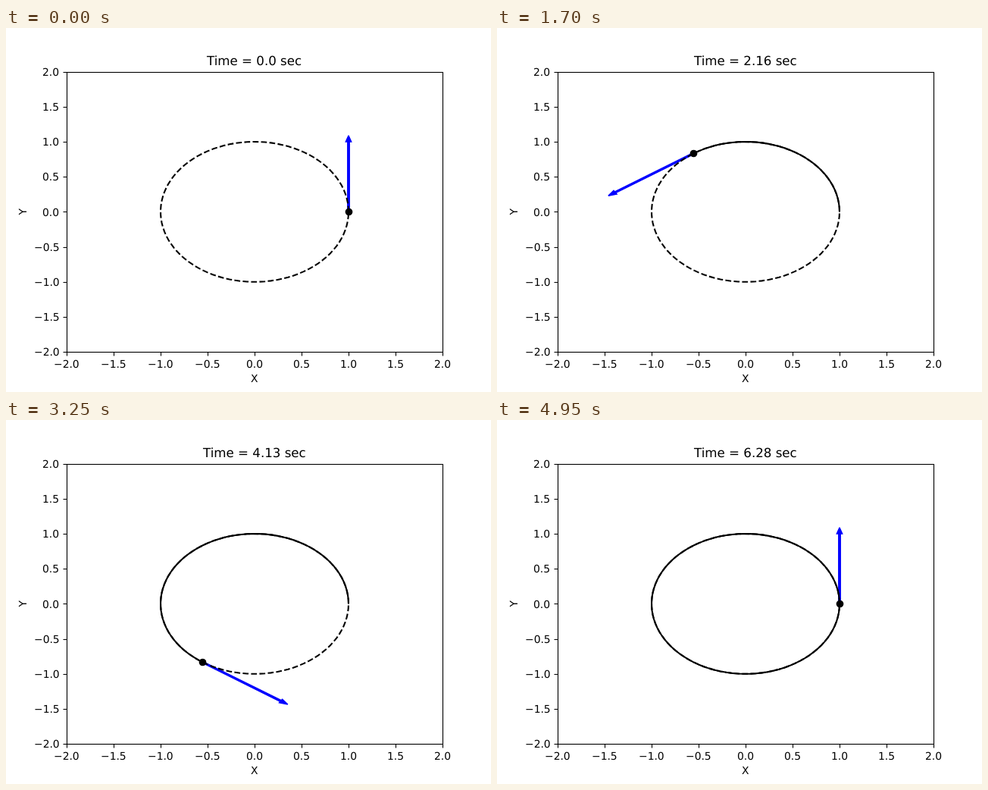
Recreate the animation shown at these times as an HTML page with a canvas. Size 640 px wide and 480 px high, loop 5000 ms.

```html
<!DOCTYPE html>
<html>
<head>
<meta charset="utf-8">
<style>
html, body { margin: 0; width: 100%; height: 100%; overflow: hidden; background: #fff; }
canvas { display: block; }
</style>
</head>
<body>
<canvas id="stage" width="640" height="480"></canvas>
<script>
const ctx = document.getElementById('stage').getContext('2d');
const STEPS = 99, STEP_MS = 50;
const PT = 100 / 72;
const SX = 124, SY = 92.4;
const px = x => 328 + SX * x;
const py = y => 242.4 - SY * y;
const snap = v => Math.floor(v + 0.5) + 0.5;

function path(points) {
  ctx.beginPath();
  for (const [x, y] of points) ctx.lineTo(x, y);
}

function label(text, x, y, size, anchor) {
  ctx.font = `${size * PT}px "DejaVu Sans", sans-serif`;
  ctx.fillText(text, Math.round(x - ctx.measureText(text).width * anchor), y);
}

function drawAxes() {
  ctx.lineWidth = 0.8 * PT;
  ctx.lineJoin = 'miter';
  ctx.strokeRect(80.5, 58.5, 496, 369);
  for (let v = -2; v <= 2; v += 0.5) {
    const text = v.toFixed(1).replace('-', '\u2212');
    const x = snap(px(v)), y = snap(py(v));
    path([[x, 427.5], [x, 432.5]]);
    ctx.stroke();
    path([[80.5, y], [75.5, y]]);
    ctx.stroke();
    label(text, px(v), 448, 10, 0.5);
    label(text, 70.3, Math.round(py(v) + 5.28), 10, 1);
  }
  label('X', 328, 467, 10, 0.5);
  ctx.save();
  ctx.translate(27, 242.4);
  ctx.rotate(-Math.PI / 2);
  label('Y', 0, 0, 10, 0.5);
  ctx.restore();
}

// The arrow is shaped in data units, so the unequal axis scales skew it.
function drawArrow(angle) {
  const c = Math.cos(angle), s = Math.sin(angle);
  const at = (along, side) => [px(c - s * along + c * side), py(s + c * along + s * side)];
  path([
    at(1.09, 0), at(1, 0.03), at(1, 0.01), at(0, 0.01),
    at(0, -0.01), at(1, -0.01), at(1, -0.03), at(1.09, 0)
  ]);
  ctx.fillStyle = ctx.strokeStyle = '#00f';
  ctx.lineWidth = PT;
  ctx.lineJoin = 'miter';
  ctx.miterLimit = 4;
  ctx.fill();
  ctx.stroke();
}

function drawOrbit(steps, dash) {
  const points = [];
  for (let i = 0; i <= steps; i++) {
    const a = 2 * Math.PI * i / STEPS;
    points.push([px(Math.cos(a)), py(Math.sin(a))]);
  }
  path(points);
  ctx.lineWidth = 1.5 * PT;
  ctx.lineJoin = 'round';
  ctx.setLineDash(dash.map(d => d * ctx.lineWidth));
  ctx.stroke();
  ctx.setLineDash([]);
}

function draw(now) {
  const step = Math.floor(now / STEP_MS) % (STEPS + 1);
  const time = 2 * Math.PI * step / STEPS;
  const rounded = Math.round(time * 100) / 100;
  const shown = Number.isInteger(rounded) ? rounded.toFixed(1) : rounded;

  ctx.fillStyle = '#fff';
  ctx.fillRect(0, 0, 640, 480);
  ctx.textRendering = 'geometricPrecision';
  drawArrow(time);
  ctx.fillStyle = ctx.strokeStyle = '#000';
  drawOrbit(STEPS, [3.7, 1.6]);
  drawOrbit(step, []);
  ctx.beginPath();
  ctx.arc(snap(px(Math.cos(time))), snap(py(Math.sin(time))), 3.5 * PT, 0, 2 * Math.PI);
  ctx.fill();
  drawAxes();
  label(`Time = ${shown} sec`, 328, 49, 12, 0.5);
  requestAnimationFrame(loop);
}

function loop() {
  draw(performance.now());
}

draw(0);
</script>
</body>
</html>
```
